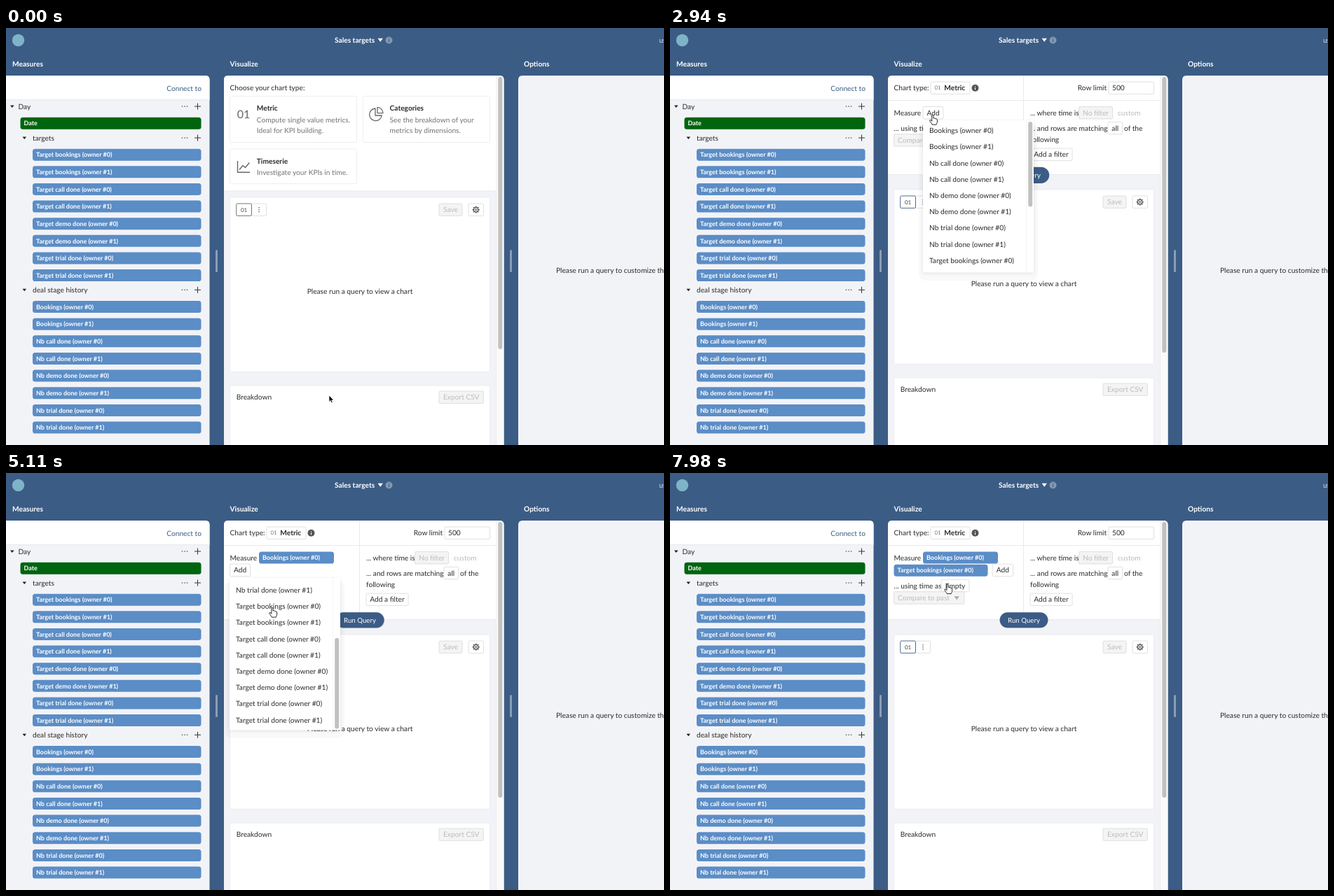
These frames come from a looping animation (939 px wide and 596 px high, 8000 ms). An HTML page:

```html
<!DOCTYPE html>
<html lang="en">
<head>
<meta charset="utf-8">
<title>Sales targets</title>
<style>
html, body { margin: 0; width: 100%; height: 100%; overflow: hidden; background: #3b5c85; }
svg { display: block; }
text {
  font-family: Lato, "Open Sans", sans-serif;
  text-rendering: geometricPrecision;
  white-space: pre;
}
</style>
</head>
<body>
<svg id="stage" width="939" height="596" viewBox="0 0 939 596"></svg>
<script>
const BLUE = '#3b5c85', PILL = '#5b8dc6', INK = '#2b2b2b', SOFT = '#737373', OFF = '#bcbcbc';
const PANEL = '#f2f3f7', LINE = '#e8e9ed', EDGE = '#d6d6d6';
const SIZE = 10.2, ROW = 23.2, VIEW = 217.5, PAD = 2.9, MENU_W = 158;

// ---- drawing helpers ----
const rect = (x, y, w, h, fill, stroke = 'none', r = 1.5) =>
  `<rect x="${x}" y="${y}" width="${w}" height="${h}" rx="${r}" fill="${fill}" stroke="${stroke}" stroke-width=".75"/>`;
// y is the middle of the capitals
const text = (x, y, s, fill = INK, weight = 400, size = SIZE, anchor = 'start') =>
  `<text x="${x}" y="${y + size * .355}" fill="${fill}" font-weight="${weight}" font-size="${size}" text-anchor="${anchor}">${s}</text>`;
const bold = (x, y, s, fill = INK) => text(x, y, s, fill, 700);
const mid = (x, y, s, fill, size) => text(x, y, s, fill, 400, size, 'middle');
const path = (d, stroke, width = 1, fill = 'none') =>
  `<path d="${d}" fill="${fill}" stroke="${stroke}" stroke-width="${width}" stroke-linejoin="round"/>`;
const group = (id, body, hidden) => `<g id="${id}"${hidden ? ' display="none"' : ''}>${body}</g>`;
const button = (x, y, w, s, off) =>
  rect(x, y - 8.7, w, 17.4, off ? '#f4f4f5' : '#fff', EDGE) + mid(x + w / 2, y, s, off ? OFF : INK);
const pill = (x, y, w, s, fill = PILL) =>
  rect(x, y - 8.5, w, 17, fill, 'none', 3.6) + text(x + 5, y, s, '#fff', 700, 9);
const info = (x, y, fill, ink) =>
  `<circle cx="${x}" cy="${y}" r="5" fill="${fill}"/>` +
  path(`M${x} ${y - .8}v3.3M${x} ${y - 2.8}v1.2`, ink, 1.1);

// ---- data ----
const pair = name => [0, 1].map(n => `${name} (owner #${n})`);
const targets = ['bookings', 'call done', 'demo done', 'trial done'].flatMap(s => pair('Target ' + s));
const deals = ['Bookings', 'Nb call done', 'Nb demo done', 'Nb trial done'].flatMap(pair);
const options = [...deals, ...targets];

// ---- fixed parts ----
function header() {
  const grip = x => rect(x, 317, 3, 32, '#8a9eb8', 'none', 1.5);
  return `<circle cx="17.5" cy="17.5" r="8.7" fill="#7fb3c8"/>` +
    bold(469, 17.5, 'Sales targets', '#fff') + path('M530.5 14.8h7.4l-3.7 5z', 'none', 0, '#fff') +
    info(546.5, 17.5, '#8296b0', BLUE) + text(932, 17, 'user', '#d7dfe9') +
    bold(9, 51.5, 'Measures', '#fff') + bold(319.5, 51.5, 'Visualize', '#fff') +
    bold(739, 51.5, 'Options', '#fff') + grip(299) + grip(719);
}

function sidebar() {
  const head = (x, y, s) =>
    path(`M${x} ${y - 1.5}h5.6l-2.8 3.4z`, 'none', 0, '#222') + text(x + (x < 20 ? 11.5 : 14.5), y, s) +
    [251.5, 255, 258.5].map(cx => `<circle cx="${cx}" cy="${y}" r=".8" fill="#444"/>`).join('') +
    path(`M269 ${y}h9M273.5 ${y - 4.5}v9`, '#333', 1);
  const list = (y, names) => names.map((s, i) => pill(38, y + i * 24.63, 240.5, s)).join('');
  return path('M0 68H284.5Q290.5 68 290.5 74V596H0z', 'none', 0, PANEL) +
    path('M0 68H284.5Q290.5 68 290.5 74V102.5H0z', 'none', 0, '#fff') +
    path('M0 102.5H290.5', LINE) +
    text(279, 86, 'Connect to', BLUE, 400, SIZE, 'end') +
    head(6, 112, 'Day') + pill(20.5, 136.3, 258, 'Date', '#00650f') +
    head(23.5, 157, 'targets') + list(181.2, targets) +
    head(23.5, 374.3, 'deal stage history') + list(398.6, deals);
}

const gear = (x, y) => {
  const teeth = [...Array(8)].map((_, i) => {
    const a = i * Math.PI / 4, c = Math.cos(a), s = Math.sin(a);
    return `M${x + 3.3 * c} ${y + 3.3 * s}L${x + 4.9 * c} ${y + 4.9 * s}`;
  }).join('');
  return path(teeth, '#333', 1.5) +
    `<circle cx="${x}" cy="${y}" r="3.4" fill="#fff" stroke="#333"/><circle cx="${x}" cy="${y}" r="1.3" fill="none" stroke="#333" stroke-width=".9"/>`;
};

function chart() {
  return rect(319.5, 242, 371, 249.5, '#fff', LINE, 2) +
    rect(350.5, 251, 21, 17.4, '#fff', EDGE) +
    `<rect id="tab" x="328.7" y="251" width="21.8" height="17.4" rx="1.5" fill="#fff" stroke="#666" stroke-width=".9"/>` +
    mid(339.6, 259.7, '01', '#444', 8) +
    [-3, 0, 3].map(d => `<circle cx="361" cy="${259.7 + d}" r=".75" fill="#444"/>`).join('') +
    button(618, 259.7, 33, 'Save', true) + button(660, 259.7, 21.5, '') + gear(670.7, 259.7) +
    mid(505, 376, 'Please run a query to view a chart') +
    rect(319.5, 511, 371, 120, '#fff', LINE, 2) + text(328.7, 527.5, 'Breakdown') +
    button(618, 527.7, 63.5, 'Export CSV', true);
}

// ---- the two query forms ----
function picker() {
  const card = (x, y, h, title, lines) => rect(x, y, 181, h, '#fff', LINE, 2) +
    bold(x + 38.3, y + 17, title) +
    lines.map((s, i) => text(x + 38.3, y + 33.5 + i * 15.8, s, SOFT)).join('');
  return rect(311, 74, 388.5, 159, '#fff', 'none', 0) + path('M311 233H699.5', LINE) +
    text(319.5, 85.3, 'Choose your chart type:') +
    `<rect id="glow" x="319.5" y="97.5" width="181" height="66" rx="2" fill="#fff" opacity="0" style="filter:drop-shadow(0 3px 4px rgba(0,0,0,.2))"/>` +
    card(319.5, 97.5, 66, 'Metric', ['Compute single value metrics.', 'Ideal for KPI building.']) +
    card(509.3, 97.5, 66, 'Categories', ['See the breakdown of your', 'metrics by dimensions.']) +
    card(319.5, 173, 49.5, 'Timeserie', ['Investigate your KPIs in time.']) +
    text(329.8, 123.3, '01', '#666', 400, 16) +
    path('M527 115A8.8 8.8 0 1 0 536.2 125H527z', '#666', 1.3) +
    path('M530 113.4A8.2 8.2 0 0 1 538 121.6H530z', '#666', 1.3) +
    path('M330.5 190V206.3H348M333 202.5L338 196.5L341.5 199.5L347.3 192.5', '#666', 1.4);
}

function timeRow(y) {
  return text(319.5, y, '... using time as') + button(387, y, 40, 'Empty') +
    rect(319.5, y + 8.7, 100.5, 17.4, '#f4f4f5', EDGE) + text(325, y + 17.4, 'Compare to past', OFF) +
    path(`M405.5 ${y + 15.3}h7.4l-3.7 5z`, 'none', 0, '#aaa');
}

function form() {
  return rect(311, 74, 388.5, 135.5, '#fff', 'none', 0) +
    path('M311 209.5H699.5M311 103.5H699.5M504.5 68V209.5', LINE) +
    text(319.5, 85.7, 'Chart type:') + rect(372, 77, 56, 17.4, '#fff', EDGE) +
    text(377.5, 85.7, '01', '#777', 400, 7.8) + bold(391.3, 85.7, 'Metric') + info(435.5, 85.7, '#555', '#fff') +
    text(581.7, 85.7, 'Row limit') + rect(626, 77, 64.5, 17.4, '#fff', EDGE) + text(631, 85.7, '500') +
    text(319.5, 121, 'Measure') +
    text(514, 121.2, '... where time is') + button(583.5, 121.2, 48, 'No filter', true) + text(639, 121.2, 'custom', OFF) +
    text(514, 143, '... and rows are matching') + button(625, 143, 20.5, 'all') + text(648, 143, 'of the') +
    text(514, 159.7, 'following') + button(514, 180.8, 60, 'Add a filter') +
    group('none', button(361, 121.2, 29, 'Add') + timeRow(143)) +
    group('some', pill(361, 121, 107, options[0]) + timeRow(161)) +
    group('one', button(319.5, 138.8, 29, 'Add')) +
    group('two', pill(319.5, 139.2, 134, targets[0]) + button(460, 138.8, 29.5, 'Add'));
}

const runButton = () =>
  `<rect id="halo" fill="${BLUE}"/><g id="run">${rect(-36.2, -11.6, 72.4, 23.2, BLUE, 'none', 11.6)}${mid(0, 0, 'Run Query', '#fff')}</g>`;

// ---- dropdown menus ----
function menu(id, x, y, items) {
  const content = items.length * ROW + 2 * PAD, bar = VIEW * VIEW / content - 4;
  return { id, x, y, max: content - VIEW, run: VIEW - 4 - bar, svg:
    `<g id="${id}" transform="translate(${x} ${y})" display="none">` +
    rect(-6, 5, MENU_W + 12, VIEW + 6.5, 'rgba(0,0,0,.025)', 'none', 9) +
    `<g style="filter:drop-shadow(0 1.5px 2px rgba(0,0,0,.1))">${rect(0, 0, MENU_W, VIEW, '#fff')}</g>` +
    `<svg width="${MENU_W}" height="${VIEW}"><g class="list">` +
    `<rect class="hover" width="147.5" height="${ROW}" fill="#f3f4f6" opacity="0"/>` +
    items.map((s, i) => text(9, PAD + (i + .5) * ROW, s)).join('') +
    `</g></svg>` + path(`M147.8 0V${VIEW}`, '#f0f0f0', .75) +
    `<g class="bar">${rect(150.2, 2, 6, bar, '#c1c1c1', 'none', 3)}</g></g>` };
}
const menus = [
  menu('menu0', 361, 132, options),
  menu('menu1', 319, 150, options.slice(1)),
  menu('menu2', 460, 150, options.slice(1).filter(s => s !== targets[0]))
];

const pointers =
  group('arrow', path('M0 0V9.4L2.1 7.4L3.6 10.9L5.2 10.2L3.7 6.9H6.6z', '#fff', .7, '#000')) +
  group('hand', path('M-1.1 5.5V1C-1.1-.4 1.1-.4 1.1 1V4.6C1.3 3.8 3 3.9 3.1 5C3.6 4.4 4.9 4.6 5 5.7C5.6 5.2 6.6 5.6 6.6 6.6V9.5C6.6 11.5 5.4 12 5.3 13.6H-.8C-.8 12.5-2.4 11-4 8.6C-4.8 7.2-3.2 6.2-2.2 7.4L-1.1 8.7z', '#111', .9, '#fff')) +
  group('beam', path('M-2.4-5.5Q0-5.5 0-4.2Q0-5.5 2.4-5.5M0-4.2V4.2M-2.4 5.5Q0 5.5 0 4.2Q0 5.5 2.4 5.5', '#222', .9));

const stage = document.getElementById('stage');
stage.innerHTML = rect(0, 0, 939, 596, BLUE, 'none', 0) + header() + sidebar() +
  path('M939 68H737Q731 68 731 74V596H939z', 'none', 0, PANEL) +
  text(785, 346, 'Please run a query to customize the chart') +
  path('M311 596V74Q311 68 317 68H704.5Q710.5 68 710.5 74V596z', 'none', 0, PANEL) +
  path('M311 80V74Q311 68 317 68H699.5V80z', 'none', 0, '#fff') +
  path('M699.5 68H704.5Q710.5 68 710.5 74V596H699.5z', 'none', 0, '#fafafa') +
  path('M699.7 68V596', '#e9e9e9', .75) +
  `<rect id="thumb" x="702.3" y="70" width="6" rx="3" fill="#c1c1c1"/>` +
  group('picker', picker()) + group('form', form()) + group('chart', chart()) +
  group('runBox', runButton()) + menus.map(m => m.svg).join('') + group('pointer', pointers);

// ---- motion ----
const $ = id => document.getElementById(id);
const set = (el, attrs) => { for (const k in attrs) el.setAttribute(k, attrs[k]); };
const show = (id, on) => set($(id), { display: on ? 'inline' : 'none' });
const clamp = v => Math.max(0, Math.min(1, v));
const ease = v => { v = clamp(v); return v * v * (3 - 2 * v); };
const ramp = (t, a, b) => ease((t - a) / (b - a));

const LOOP = 8000, PICK = 1680, OPEN = 2520, FIRST = 3640, SECOND = 7000, CLOSE = 7560;

// time, x, y
const moves = [
  [0, 461, 525], [70, 461, 525], [860, 387, 147.5], [1679, 387, 147.5],
  [1680, 385, 143], [2100, 385, 143], [2360, 374.5, 124], [2900, 374.5, 124],
  [3360, 387, 148], [3639, 387, 148], [3640, 386, 147], [3850, 386, 147],
  [4350, 380, 193], [5260, 380, 192.5], [5720, 376, 287], [6090, 378, 261],
  [6580, 380, 216], [6900, 380, 193.5], [7200, 380, 193.5], [7760, 381, 171], [7970, 396, 159], [8000, 396, 159]
];
// time, pointer shape
const shapes = [
  [0, 'arrow'], [1050, 'hand'], [1680, 'beam'], [2170, 'hand'], [3640, 'arrow'],
  [3990, 'hand'], [7000, 'arrow'], [7840, 'hand']
];

function pointerAt(t) {
  const i = Math.max(1, moves.findIndex(m => m[0] > t));
  const [a, b] = [moves[i - 1], moves[i]], u = ramp(t, a[0], b[0]);
  return [a[1] + (b[1] - a[1]) * u, a[2] + (b[2] - a[2]) * u];
}

function drawMenu(m, scroll, row) {
  const el = $(m.id), hover = el.querySelector('.hover');
  set(el.querySelector('.list'), { transform: `translate(0 ${-scroll})` });
  set(el.querySelector('.bar'), { transform: `translate(0 ${m.run * scroll / m.max})` });
  set(hover, { y: PAD + row * ROW, opacity: row < 0 ? 0 : 1 });
}

function drawRun(t) {
  let scale = 1, spread = 0, alpha = 0;
  if (t >= FIRST) {
    const p = Math.max(0, t - 3780) / 1400 % 1;
    const u = p < .7 ? ease(p / .7) : 1 - ease((p - .7) / .3);
    scale = .95 + .05 * u;
    spread = 7.25 * u;
    alpha = .4 * (1 - u);
  }
  const w = (36.2 + spread) * scale, h = (11.6 + spread) * scale;
  set($('run'), { transform: `translate(505 210.3) scale(${scale})` });
  set($('halo'), { x: 505 - w, y: 210.3 - h, width: 2 * w, height: 2 * h, rx: h, opacity: alpha });
}

function draw(t) {
  const query = t >= PICK, first = t >= FIRST, second = t >= SECOND;
  show('picker', !query);
  show('form', query);
  show('runBox', query);
  show('none', !first);
  show('some', first);
  show('one', first && !second);
  show('two', second);
  set($('chart'), { transform: `translate(0 ${query ? -11 : 0})` });
  set($('tab'), { stroke: query ? BLUE : '#666' });
  set($('thumb'), { height: query ? 394 : 389 });
  set($('glow'), { opacity: ramp(t, 1000, 1420) });

  const [x, y] = pointerAt(t);
  show('menu0', t >= OPEN && !first);
  show('menu1', first && !second);
  show('menu2', second && t < CLOSE);
  set($('menu0'), { opacity: ramp(t, OPEN, OPEN + 140) });
  const scroll = menus[1].max * ramp(t, 4350, 4970);
  const row = t > 5260 ? Math.floor((y - menus[1].y - PAD + scroll) / ROW) : -1;
  drawMenu(menus[0], 0, -1);
  drawMenu(menus[1], scroll, row);
  drawMenu(menus[2], menus[2].max, -1);
  drawRun(t);

  const shape = shapes.filter(s => s[0] <= t).pop()[1];
  for (const id of ['arrow', 'hand', 'beam']) show(id, id === shape);
  set($('pointer'), { transform: `translate(${x} ${y})` });
}

const start = performance.now();
function tick() {
  draw((performance.now() - start) % LOOP);
  requestAnimationFrame(tick);
}
tick();
</script>
</body>
</html>
```
